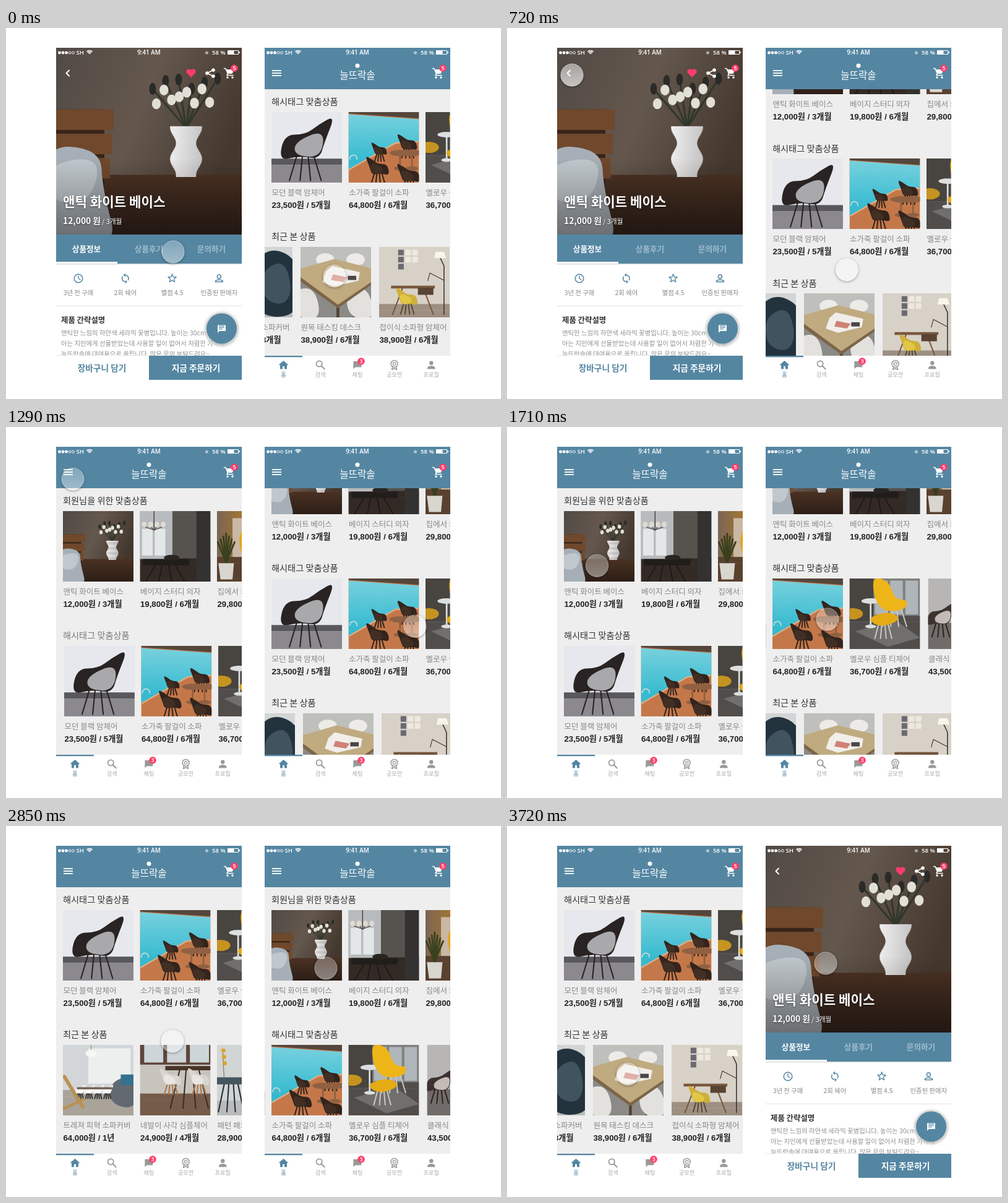
An HTML page with a canvas that plays this animation: 800x600 px, repeating every 3.75 s.

```html
<!DOCTYPE html>
<html lang="ko">
<head>
<meta charset="utf-8">
<style>
html, body { margin: 0; width: 100%; height: 100%; overflow: hidden; background: #fff; }
canvas { display: block; }
</style>
</head>
<body>
<canvas id="stage" width="800" height="600"></canvas>
<script>
const ctx = document.getElementById('stage').getContext('2d');
const LOOP = 3750, STEP = 30;
const BLUE = '#5486a2', PINK = '#ff3d6c', WHITE = '#fff';
const SANS = '"Noto Sans CJK KR","Noto Sans CJK",sans-serif';
const ARIAL = '"Liberation Sans","Noto Sans CJK KR",sans-serif';
const UI = '"Open Sans","Noto Sans CJK KR",sans-serif';

const clamp = v => Math.max(0, Math.min(1, v));
const mix = (a, b, k) => a + (b - a) * k;
const easeOut = u => 1 - Math.pow(1 - clamp(u), 3);
const smooth = u => { u = clamp(u); return u * u * (3 - 2 * u); };
const times = (n, fn) => { for (let i = 0; i < n; i++) fn(i); };

// Position on a path of [time, x, y] stops
function along(t, stops) {
  const i = Math.max(1, stops.findIndex(s => s[0] > t));
  const a = stops[i - 1], b = stops[i], u = smooth((t - a[0]) / (b[0] - a[0]));
  return [mix(a[1], b[1], u), mix(a[2], b[2], u)];
}

// Drawing helpers
function rect(color, x, y, w, h) { ctx.fillStyle = color; ctx.fillRect(x, y, w, h); }
function trace(p) {
  ctx.beginPath();
  for (let i = 0; i < p.length; i += 2) ctx.lineTo(p[i], p[i + 1]);
}
function poly(color, ...p) { trace(p); ctx.fillStyle = color; ctx.fill(); }
function line(color, w, ...p) {
  trace(p);
  ctx.strokeStyle = color; ctx.lineWidth = w; ctx.lineCap = ctx.lineJoin = 'round';
  ctx.stroke();
}
// Closed smooth shape pulled towards each point
function blob(color, ...p) {
  const n = p.length, mid = i => mix(p[i % n], p[(i + 2) % n], .5);
  ctx.beginPath(); ctx.moveTo(mid(0), mid(1));
  for (let i = 2; i <= n; i += 2) ctx.quadraticCurveTo(p[i % n], p[(i + 1) % n], mid(i), mid(i + 1));
  ctx.fillStyle = color; ctx.fill();
}
function oval(color, x, y, rx, ry = rx) {
  ctx.beginPath(); ctx.ellipse(x, y, rx, ry, 0, 0, 7);
  ctx.fillStyle = color; ctx.fill();
}
function ring(color, w, x, y, r, from = 0, to = 7) {
  ctx.beginPath(); ctx.arc(x, y, r, from, to);
  ctx.strokeStyle = color; ctx.lineWidth = w; ctx.stroke();
}
function fade(x0, y0, x1, y1, ...colors) {
  const g = ctx.createLinearGradient(x0, y0, x1, y1);
  colors.forEach((c, i) => g.addColorStop(i / (colors.length - 1), c));
  return g;
}
function text(s, x, y, size, color, weight = 400, align = 'left', font = SANS) {
  ctx.font = `${weight} ${size}px ${font}`;
  ctx.textAlign = align; ctx.textBaseline = 'middle'; ctx.fillStyle = color;
  ctx.fillText(s, x, y);
}
function group(x, y, sx, sy, draw) {
  ctx.save(); ctx.translate(x, y); ctx.scale(sx, sy); draw(); ctx.restore();
}
function layer(alpha, draw) {
  if (alpha <= 0) return;
  ctx.save(); ctx.globalAlpha *= alpha; draw(); ctx.restore();
}
function clip(x, y, w, h, draw) {
  ctx.save(); ctx.beginPath(); ctx.rect(x, y, w, h); ctx.clip(); draw(); ctx.restore();
}
function shadow(color, blur) {
  ctx.shadowColor = color; ctx.shadowBlur = blur; ctx.shadowOffsetY = 1;
}

// Icons around their own centre
const ICONS = {
  home(c) {
    poly(c, -8, 0, 0, -7, 8, 0);
    rect(c, -5.5, -1, 11, 3);
    for (const x of [-5.5, 1.5]) rect(c, x, -1, 4, 7.5);
  },
  search(c) { ring(c, 1.8, -2, -2, 4.6); line(c, 2, 1.5, 1.5, 6.5, 6.5); },
  chat(c) { rect(c, -6.5, -6, 13, 9.5); poly(c, -6.5, 2, -6.5, 6.5, -2, 2); },
  award(c) {
    ring(c, 1.5, 0, -2, 5.5); ring(c, 1.2, 0, -2, 2.4);
    line(c, 1.5, -3, 3, -4, 7.5, 0, 5.5, 4, 7.5, 3, 3);
  },
  person(c) {
    oval(c, 0, -3.2, 3.2);
    clip(-7, 1, 14, 5.5, () => oval(c, 0, 5.5, 6.4, 4.2));
  },
  seller(c) {
    ring(c, 1.5, 0, -3, 3);
    line(c, 1.5, -6, 5.5, -6, 4, -2.5, 2.3, 2.5, 2.3, 6, 4, 6, 5.5, -6, 5.5);
  },
  clock(c) { ring(c, 1.5, 0, 0, 6.8); line(c, 1.4, 0, -4, 0, 0, 3, 2); },
  sync(c) {
    for (const side of [1, -1]) group(0, 0, side, side, () => {
      ring(c, 1.6, 0, 0, 5.2, -1.5, .6);
      poly(c, 0, -8.5, 0, -2.5, -3.2, -5.5);
    });
  },
  star(c) {
    const p = [];
    times(11, i => p.push(Math.sin(i * Math.PI / 5) * (i % 2 ? 3 : 7), -Math.cos(i * Math.PI / 5) * (i % 2 ? 3 : 7)));
    line(c, 1.4, ...p);
  },
  heart(c) {
    for (const side of [-1, 1]) oval(c, 3.5 * side, -2.5, 4);
    poly(c, -7, -.5, 0, 7, 7, -.5, 0, -3);
  },
  share(c) {
    line(c, 1.6, 5, -5, -5, 0, 5, 5);
    for (const y of [-5, 0, 5]) oval(c, y ? 5 : -5, y, 2.8);
  },
  cart(c) {
    poly(c, -5, -6, 8, -6, 4.5, 1, -2.2, 1);
    line(c, 1.6, -8.5, -7.5, -6, -7.5, -2.5, 1, -4, 3.5, 6, 3.5);
    for (const x of [-3, 5]) oval(c, x, 7, 1.7);
  },
  menu(c) { for (const y of [-5, -1, 3]) rect(c, -7.5, y, 15, 1.8); },
  back(c) { line(c, 2, 2, -4.5, -2.5, 0, 2, 4.5); }
};
const icon = (name, x, y, color) => group(x, y, 1, 1, () => ICONS[name](color));
function badge(n, x, y) {
  oval(PINK, x, y, 5.8);
  text(n, x, y + .3, 9, WHITE, 600, 'center', UI);
}

// Furniture for the product pictures, which use a 100 x 100 field
function room(wall, floor, horizon, skirting = floor) {
  rect(wall, 0, 0, 100, 100);
  rect(skirting, 0, horizon - 9, 100, 9);
  rect(floor, 0, horizon, 100, 100 - horizon);
}
function panes(color, n, x, y, w, h) { times(n, i => rect(color, x + i * w * 1.2, y, w, h)); }
function legs(color, x, y, w, h, n = 4) {
  times(n, i => line(color, 1.8, x + (i / (n - 1) - .5) * w * .5, y, x + (i / (n - 1) - .5) * w, y + h));
}
function chair(x, y, s, shell, seat, leg, flip = 1) {
  legs(leg, x, y + s * .35, s * .9, s * .75);
  group(x, y, s * flip, s, () => {
    blob(shell, -.75, .55, -.6, -.2, 0, -.2, .4, -.5, .85, -.75, .55, 0, .4, .5, -.2, .4);
    blob(seat, -.3, 0, .55, -.35, .45, .45, -.3, .4);
  });
}
function pedestal(x, y, r, color, h) {
  line(color, 2.4, x, y, x, y + h);
  oval(color, x, y + h, r * .6, r * .2);
  oval(color, x, y, r, r * .3);
}

const SCENES = {
  vase() {
    rect(fade(0, 0, 100, 40, '#514a45', '#64574d', '#44372e'), 0, 0, 100, 100);
    rect(fade(0, 67, 0, 100, '#4b3223', '#2c1e17'), 20, 68, 80, 32);
    rect('#382419', 0, 33, 26, 40);
    times(3, i => rect('#70482c', 0, 33 + 13 * i, 31 - i, 11));
    blob('#a6afb7', -9, 52, 24, 54, 25, 76, 34, 108, -9, 108);
    blob('#c0c8cd', -5, 62, 25, 58, 18, 84, -5, 82);
    times(6, i => {
      const x = 52 + 7 * i, y = 19 + 3 * Math.cos(i * 2);
      line('#2f372c', 1, 70, 43, x, y);
      oval('#2a2a28', x, y, 1.8, 3.2);
    });
    times(27, i => rect(fade(61, 0, 79, 0, '#f0efee', '#c5c4c5'), 70 - 7 - 1.6 * Math.cos(i * .37), 42 + i, 14 + 3.2 * Math.cos(i * .37), 1.2));
    times(8, i => oval('#e2e0d6', 54 + 4.1 * i, 26 + 4 * Math.cos(i * 2.6), 2.4, 2.9));
  },
  study() {
    room('#56534f', '#342a25', 76);
    rect('#b8bbbd', 0, 0, 46, 68);
    panes('#e4e7e8', 2, 3, 25, 15, 38);
    rect('#343230', 80, 0, 20, 100);
    line('#433a34', 1.2, 20, 0, 20, 25);
    times(4, i => { line('#433a34', 1, 20, 27, 6 + 9 * i, 22); oval('#dedbd2', 6 + 9 * i, 19, 3.5, 4); });
    legs('#1d1a19', 36, 76, 55, 24);
    rect('#211d1b', 4, 68, 66, 9);
    oval('#282522', 45, 66, 11, 4);
  },
  plant() {
    room(fade(0, 0, 100, 0, '#7a6555', '#b17c24', '#453128'), '#59412f', 74);
    rect('#c9b8a4', 22, 10, 14, 55);
    blob('#e2a516', 30, 22, 75, 15, 66, 74, 34, 70);
    times(7, i => line('#39401e', 2.5, 13, 73, i * 4 + 1, 32 + Math.abs(i - 3) * 4));
    poly('#d9d6d0', 2, 74, 24, 74, 22, 97, 5, 97);
  },
  armchair() {
    room('#e6e8ed', '#8b898e', 75, '#59585d');
    chair(48, 42, 50, '#292323', '#a9a9ac', '#28211f');
  },
  pool() {
    rect('#c4784a', 0, 0, 100, 100);
    poly(fade(0, 0, 0, 70, '#7ad2de', '#35bad0'), 0, 3, 100, 10, 100, 42, 66, 44, 0, 82);
    poly('#54463c', 0, 0, 100, 0, 100, 9, 0, 2);
    line('#e0ae84', 2, 0, 82, 66, 44, 100, 42);
    ring('#d6dcda', 1.3, 7, 66, 5, 3, 6.5);
    const wicker = (x, y, s) => chair(x, y, s, '#33241d', '#422f24', '#33241d', -1);
    wicker(44, 53, 15); wicker(84, 44, 19);
    for (const x of [90, 73]) pedestal(x, 58, 15, '#8f6142', 22);
    wicker(42, 78, 22); wicker(86, 88, 22);
  },
  lounge() {
    room('#7f7f7d', '#504d4b', 62);
    rect('#48443f', 0, 0, 34, 60);
    panes('#aeb6ba', 3, 36, 3, 18, 48);
    poly('#706f6d', 8, 75, 65, 59, 100, 84, 54, 97);
    oval('#c59320', 5, 50, 14, 8);
    pedestal(30, 32, 13, '#dcdfdf', 36);
    legs('#c7c6be', 64, 40, 34, 28);
    blob('#eeb518', 30, -3, 56, 3, 64, 30, 84, 30, 78, 46, 40, 46);
    legs('#c7c6be', 48, 62, 24, 23);
    blob('#e5ab14', 24, 56, 56, 46, 75, 58, 43, 70);
  },
  classic() {
    room('#b7b6b5', '#716c69', 72);
    chair(18, 52, 28, '#3e3230', '#c3bbb5', '#2d2422');
  },
  living() {
    room('#d2d6d8', '#a9a39a', 73);
    rect('#ecefee', 36, 5, 60, 50);
    line('#7d7d7d', .8, 40, 0, 40, 9);
    oval('#f7f7f5', 40, 12, 8, 5);
    blob('#626970', 68, 50, 105, 44, 105, 92, 66, 84);
    rect('#33718d', 82, 42, 18, 15);
    times(4, i => chair(24 + 13 * i, 64, 11, '#f2f2f1', '#fbfbfa', '#393939'));
    rect('#746155', 20, 60, 50, 3);
    line('#ba9152', 5, 2, 45, 28, 88);
    line('#ba9152', 4, 0, 91, 30, 77);
  },
  dining() {
    room('#c8c4bd', '#755b4a', 78);
    rect('#5d463a', 0, 0, 100, 28);
    panes('#ced5d8', 3, 6, 0, 27, 25);
    legs('#3d2b23', 70, 35, 54, 55);
    rect('#49342a', 36, 30, 64, 6);
    for (const x of [84, 44]) chair(x, 47, 21, '#d8d4ce', '#e9e6e2', '#ab7649', -1);
  },
  cover() {
    room('#d2d5d5', '#b9bbba', 88);
    line('#74756a', 1, 10, 45, 8, 8);
    times(3, i => oval('#dca32a', 9 + i, 8 + 9 * i, 3));
    legs('#202d38', 20, 52, 36, 43);
    rect('#45565f', 0, 46, 40, 10);
    blob('#22333e', 34, 40, 66, -2, 112, 20, 112, 98, 50, 100);
    blob('#40535f', 56, 34, 88, 18, 100, 60, 88, 84, 58, 74);
  },
  table() {
    room('#bfbfbb', '#8b8a86', 40);
    for (const x of [35, 78]) oval('#ecebe7', x, 18, 13, 9);
    for (const x of [10, 86]) { legs('#5b5149', x, 80, 22, 20); blob('#e2e1de', x - 22, 62, x + 10, 56, x + 20, 104, x - 18, 100); }
    line('#4f4236', 4, 53, 82, 53, 100);
    poly('#7c6448', 0, 43, 53, 80, 100, 49, 100, 54, 53, 87, 0, 49);
    poly('#c0aa80', 0, 31, 48, 17, 100, 30, 100, 50, 53, 82, 0, 43);
    poly('#f1eeea', 36, 35, 45, 27, 84, 36, 82, 48, 48, 56, 31, 50);
    poly('#cf8175', 46, 39, 66, 43, 61, 50, 43, 47);
    rect('#4a4547', 67, 41, 12, 6);
  },
  desk() {
    room('#d8d1c7', '#9d9082', 90);
    times(7, i => rect(i % 3 ? '#eee9e0' : '#6a6a70', 27 + 10 * (i % 3), 4 + 10 * Math.floor(i / 3), 8, 8));
    line('#3c3735', 1.4, 92, 96, 92, 27, 85, 12);
    line('#3c3735', 1, 91, 47, 72, 37, 69, 48);
    poly('#f8f5eb', 80, 7, 92, 7, 95, 16, 78, 16);
    legs('#79583e', 48, 58, 58, 38, 2);
    rect('#79583e', 17, 55, 62, 4);
    rect('#594332', 55, 58, 22, 10);
    chair(40, 72, 21, '#cdb03a', '#e2c645', '#5a4936', -1);
  }
};
function picture(name, x, y, w, h) {
  clip(x, y, w, h, () => group(x, y, w / 100, h / 100, SCENES[name]));
}

const SECTIONS = [
  ['회원님을 위한 맞춤상품', [
    ['앤틱 화이트 베이스', '12,000원 / 3개월', 'vase'],
    ['베이지 스터디 의자', '19,800원 / 6개월', 'study'],
    ['집에서 키우는 화분', '29,800원 / 6개월', 'plant']]],
  ['해시태그 맞춤상품', [
    ['모던 블랙 암체어', '23,500원 / 5개월', 'armchair'],
    ['소가죽 팔걸이 소파', '64,800원 / 6개월', 'pool'],
    ['옐로우 심플 티체어', '36,700원 / 6개월', 'lounge'],
    ['클래식 패브릭 소파', '43,500원 / 6개월', 'classic']]],
  ['최근 본 상품', [
    ['트레져 피혁 소파커버', '64,000원 / 1년', 'living'],
    ['네발이 사각 심플체어', '24,900원 / 4개월', 'dining'],
    ['패턴 패브릭 소파커버', '28,900원 / 3개월', 'cover'],
    ['원목 태스킹 데스크', '38,900원 / 6개월', 'table'],
    ['접이식 소파형 암체어', '38,900원 / 6개월', 'desk']]]
];

function section(i, s) {
  const [title, items] = SECTIONS[i], top = 119 + 218 * i - s.scroll;
  if (top > 540) return;
  layer(s.enter[i], () => text(title, 11, top, 14.2, '#333', 500));
  layer(clamp(s.enter[i] * 1.6), () => items.forEach(([name, price, scene], j) => {
    const x = 11 + 124.5 * j + 2.5 * Math.max(0, j - 2) - s.shift[i];
    if (x > 300 || x < -114) return;
    picture(scene, x, top + 17, 114, 114);
    text(name, x + .5, top + 147, 12.5, '#888', 300);
    text(price, x + .5, top + 168, 13.2, '#222', 700, 'left', ARIAL);
  }));
}

function home(s) {
  rect('#eee', 0, 99, 300, 431);
  clip(0, 99, 300, 431, () => SECTIONS.forEach((_, i) => section(i, s)));
  rect(BLUE, 0, 32, 300, 67);
  icon('menu', 19.5, 73, WHITE);
  oval(WHITE, 150, 61, 3.5);
  text('늘뜨락솔', 150, 76.5, 15.6, WHITE, 400, 'center');
  icon('cart', 280, 73, WHITE);
  badge('5', 288, 65);
  rect(WHITE, 0, 530, 300, 39);
  rect(BLUE, 0, 530, 61, 2.3);
  [['home', '홈'], ['search', '검색'], ['chat', '채팅'], ['award', '공모전'], ['person', '프로필']].forEach(([name, label], i) => {
    const x = 30.5 + 59.7 * i;
    icon(name, x, 545, i ? '#999' : BLUE);
    text(label, x, 561, 9.2, i ? '#aaa' : BLUE, 400, 'center');
  });
  badge('3', 156, 539);
}

function heroOverlay(x, y, w, h) {
  rect(fade(0, 210, 0, 334, 'rgba(20,14,10,0)', 'rgba(20,14,10,.4)'), x, y, w, h);
  icon('back', 19, 73, WHITE);
  icon('heart', 218, 73, PINK);
  icon('share', 249, 73, WHITE);
  icon('cart', 280, 73, WHITE);
  badge('5', 288, 65);
  shadow('rgba(0,0,0,.5)', 3);
  text('앤틱 화이트 베이스', 11, 281, 21.2, WHITE, 700);
  text('12,000 원', 11, 312, 13.8, WHITE, 700);
  text('/ 3개월', 74, 312.5, 10.8, WHITE);
}

function detailPanel() {
  rect(WHITE, 0, 334, 300, 235);
  rect(BLUE, 0, 334, 300, 47);
  rect('#ddd', 0, 381, 300, 1.5);
  ['상품정보', '상품후기', '문의하기'].forEach((s, i) =>
    text(s, 49 + 101 * i, 357, 12.6, i ? 'rgba(255,255,255,.45)' : WHITE, 700, 'center'));
  rect(WHITE, 0, 378, 99, 3);
  [['clock', '3년 전 구매'], ['sync', '2회 쉐어'], ['star', '별점 4.5'], ['seller', '인증된 판매자']].forEach(([name, s], i) => {
    icon(name, 36 + 75.8 * i, 405, BLUE);
    text(s, 36 + 75.8 * i, 428, 10.4, '#888', 400, 'center');
  });
  rect('#e2e2e2', 0, 449, 300, 1);
  text('제품 간략설명', 8, 472, 12.4, '#333', 700);
  ['앤틱한 느낌의 하얀색 세라믹 꽃병입니다. 높이는 30cm 정도',
    '아는 지인에게 선물받았는데 사용할 일이 없어서 저렴한 가격에',
    '늘뜨락솔에 대여용으로 올립니다. 많은 문의 부탁드려요~'].forEach((s, i) =>
    text(s, 8, 493 + 17 * i, 10.4, '#909090'));
  layer(1, () => {
    oval('rgba(232,232,232,.7)', 267.5, 487, 28.5);
    shadow('rgba(0,0,0,.3)', 7);
    oval(BLUE, 267.5, 486, 24.5);
  });
  icon('chat', 267.5, 486.5, WHITE);
  times(3, i => rect(BLUE, 263, 481.5 + 2.4 * i, i < 2 ? 9 : 6, 1.1));
  rect(WHITE, 0, 530, 150, 39);
  rect('#e6e6e6', 0, 529, 150, 1);
  rect(BLUE, 150, 530, 150, 39);
  text('장바구니 담기', 74, 550, 13.7, BLUE, 700, 'center');
  text('지금 주문하기', 226, 550, 13.7, WHITE, 700, 'center');
}

// The product card grows into the hero while the panel rises
function detail(p) {
  const box = [mix(11, 0, p), mix(136, 32, p), mix(114, 300, p), mix(114, 302, p)];
  layer(p, () => rect('#eee', 0, 99, 300, 470));
  picture('vase', ...box);
  layer(smooth(p * 2 - 1), () => heroOverlay(...box));
  group(0, (1 - p) * 240, 1, 1, detailPanel);
}

function statusBar() {
  times(5, i => i < 3 ? oval(WHITE, 5.5 + 5.5 * i, 40, 2.4) : ring(WHITE, .9, 5.5 + 5.5 * i, 40, 2));
  text('SH', 32.5, 40, 9.6, WHITE, 600, 'left', UI);
  times(3, i => ring(WHITE, 1.5, 54, 43, 2 + 2.3 * i, -2.35, -.79));
  text('9:41 AM', 150, 40, 9.8, WHITE, 600, 'center', UI);
  oval('rgba(255,255,255,.5)', 243.5, 40, 2.6);
  text('58 %', 252, 40, 9.6, WHITE, 600, 'left', UI);
  ctx.strokeStyle = WHITE; ctx.lineWidth = 1;
  ctx.strokeRect(277.5, 36.5, 17, 6);
  rect(WHITE, 278, 37, 9.5, 5);
  rect(WHITE, 295.5, 38, 1.5, 3);
}

function finger([x, y], press) {
  layer(1, () => {
    ctx.beginPath();
    ctx.rect(x - 40, y - 40, 80, 80); ctx.arc(x, y, 18.5, 0, 7);
    ctx.clip('evenodd');
    shadow('rgba(0,0,0,.45)', 4);
    oval(WHITE, x, y, 18);
  });
  oval(fade(0, y - 19, 0, y + 19, `rgba(255,255,255,${.25 + press})`, `rgba(255,255,255,${.45 + press})`), x, y, 18.5);
  ring('rgba(255,255,255,.25)', 1, x, y, 18);
}

function phone(x, s) {
  clip(x, 32, 300, 537, () => group(x, 0, 1, 1, () => {
    if (s.open < 1) home(s);
    if (s.open > 0) detail(s.open);
    statusBar();
  }));
  finger(s.touch, s.press);
}

function leftState(t) {
  return {
    open: 1 - smooth((t - 780) / 390),
    scroll: 218 * easeOut((t - 2190) / 570),
    shift: [0, 120 * (easeOut((t - 1020) / 360) - 1), 329 * smooth((t - 3270) / 450)],
    enter: [smooth((t - 900) / 300), smooth((t - 1080) / 360), 1],
    press: .22 * smooth((t - 600) / 100) * (1 - smooth((t - 900) / 200)),
    touch: along(t, [[0, 270, 362], [540, 102, 86], [720, 105, 76], [1290, 108, 84], [1740, 146, 226],
      [2190, 204, 309], [2400, 198, 160], [2850, 269, 348], [3240, 330, 401], [LOOP, 194, 401]])
  };
}
function rightState(t) {
  return {
    open: easeOut((t - 2970) / 630),
    scroll: 218 - 109 * (easeOut((t - 570) / 465) + easeOut((t - 2190) / 486)),
    shift: [0, 124.5 * smooth((t - 1310) / 380), 329 - 4 * easeOut(t / 500)],
    enter: [1, 1, 1],
    press: 0,
    touch: along(t, [[0, 531, 401], [540, 545, 315], [780, 550, 405], [1290, 661, 322], [1710, 518, 311],
      [2190, 560, 230], [2400, 570, 325], [2850, 517, 230], [LOOP, 515, 222]])
  };
}

function frame() {
  const t = Math.floor(performance.now() % LOOP / STEP) * STEP;
  rect(WHITE, 0, 0, 800, 600);
  phone(81, leftState(t));
  phone(418, rightState(t));
  requestAnimationFrame(frame);
}
frame();
</script>
</body>
</html>
```
